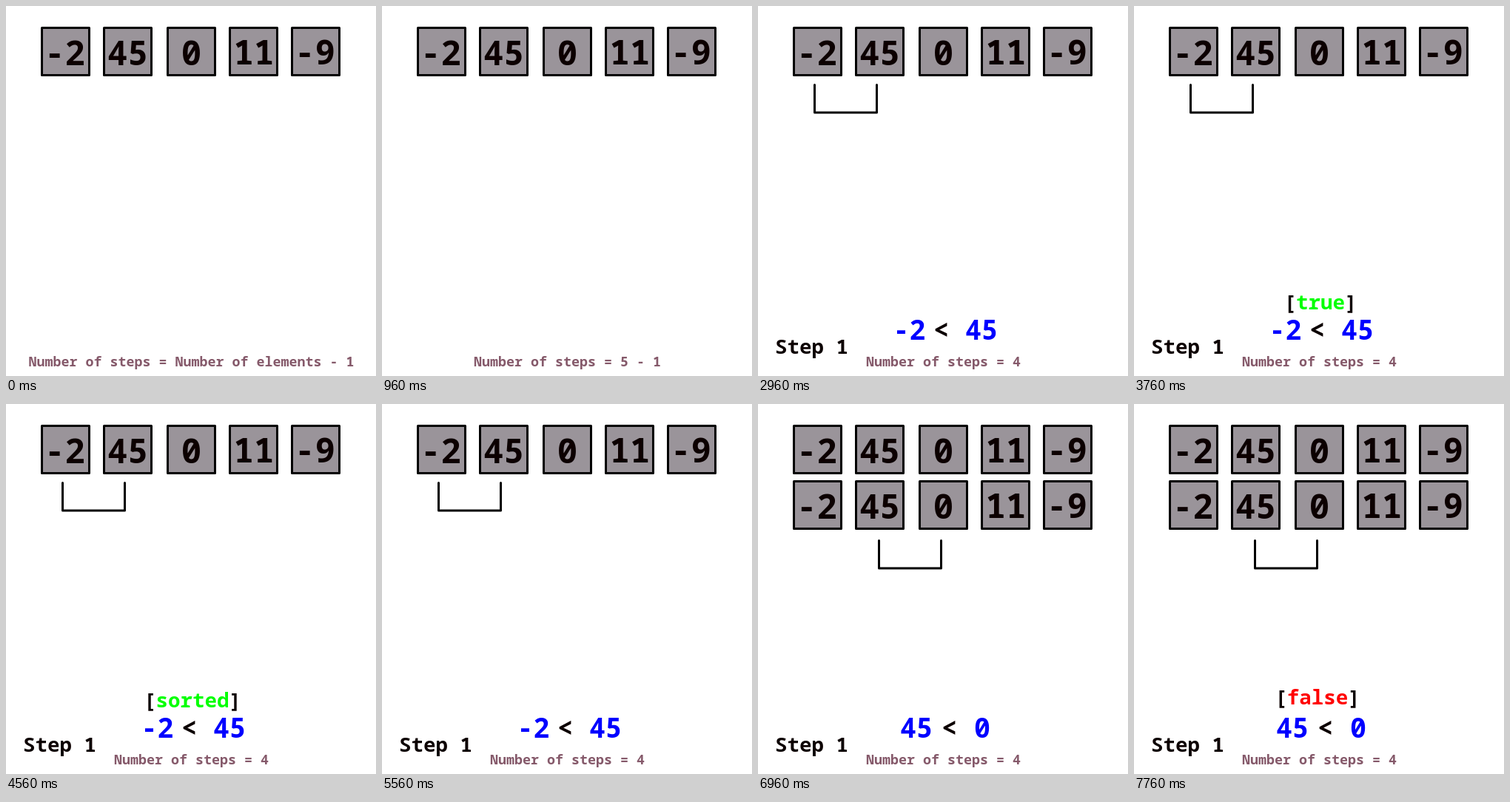
Write an HTML page that moves like this. It is 500 by 500 pixels and loops after 8 s.

```html
<!DOCTYPE html>
<html lang="en">
<head>
<meta charset="utf-8">
<title>Bubble sort, step 1</title>
<style>
  html, body { margin: 0; width: 100%; height: 100%; overflow: hidden; background: #fff; }
  svg { display: block; width: 100vw; height: 100vh; }
  text { font-family: "Noto Sans Mono", "DejaVu Sans Mono", monospace; font-weight: 700; text-anchor: middle; white-space: pre; }
  rect { fill: #9a949a; }
  rect, path { stroke: #000; stroke-width: 3; stroke-linejoin: round; stroke-linecap: round; }
  path { fill: none; }
</style>
</head>
<body>
<svg id="stage" viewBox="0 0 500 500"></svg>
<script>
const LOOP = 8000;
const INK = '#0c0000', MAUVE = '#85596a', BLUE = '#00f', GREEN = '#0f0', RED = '#f00';
const stage = document.getElementById('stage');

const text = (x, y, size, color, content) =>
  `<text x="${x}" y="${y}" font-size="${size}" fill="${color}">${content}</text>`;

// left edge, text centre, baseline, value
const cells = [
  [47, 79.5, 80, '-2'], [131, 164.5, 80, '45'], [217, 250.5, 80, '0'],
  [301, 335, 79, '11'], [385, 417.5, 79, '-9'],
];
const row = dy => cells.map(([left, x, y, value]) =>
  `<rect x="${left + 1.5}" y="${29.5 + dy}" width="64" height="64"/>` +
  text(x, y + dy, 45.8, INK, value)).join('');

const bracket = (x, y) => `<path d="M${x} ${y}v37.5h84v-37.5"/>`;
const formula = content => text(250.5, 487, 18.33, MAUVE, content);
const verdict = (x, y, color, word) =>
  text(x, y, 27.5, INK, `[<tspan fill="${color}">${word}</tspan>]`);
const compare = (x1, a, x2, x3, b) =>
  text(x1, 451, 36.7, BLUE, a) + text(x2, 451, 36.7, INK, '&lt;') + text(x3, 451, 36.7, BLUE, b);

// start, end, content
const scenes = [
  [0, LOOP, row(0)],
  [0, 960, formula('Number of steps = Number of elements - 1')],
  [960, 1560, formula('Number of steps = 5 - 1')],
  [1560, LOOP, formula('Number of steps = 4')],
  [2160, LOOP, text(72.5, 470, 27.5, INK, 'Step 1')],
  [2160, 6160, bracket(76.5, 106.5)],
  [2960, 6960, compare(204.5, '-2', 247.5, 302, '45')],
  [3760, 4560, verdict(252, 410, GREEN, 'true')],
  [4560, 5560, verdict(252, 410, GREEN, 'sorted')],
  [6160, LOOP, row(75)],
  [6960, LOOP, bracket(163.5, 184.5) + compare(214, '45', 258.5, 303, '0')],
  [7760, LOOP, verdict(248, 406, RED, 'false')],
];

for (const [start, end, content] of scenes) {
  const group = document.createElementNS('http://www.w3.org/2000/svg', 'g');
  group.innerHTML = content;
  stage.append(group);
  if (start === 0 && end === LOOP) continue;
  group.animate([
    { opacity: 0, offset: 0 },
    { opacity: 1, offset: start / LOOP },
    { opacity: end < LOOP ? 0 : 1, offset: end / LOOP },
    { opacity: end < LOOP ? 0 : 1, offset: 1 },
  ].map(frame => ({ ...frame, easing: 'step-end' })), { duration: LOOP, iterations: Infinity });
}
</script>
</body>
</html>
```
